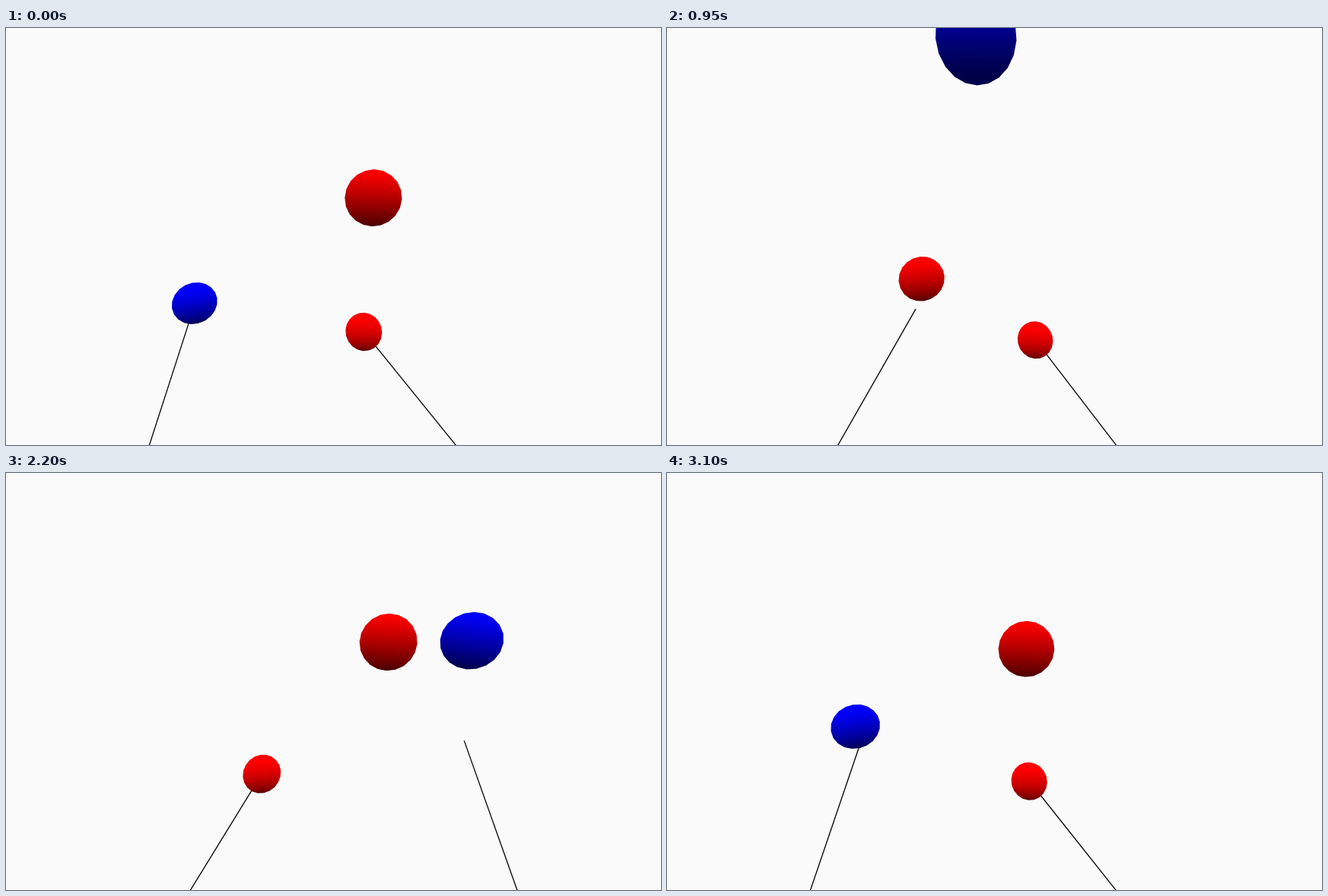
Write an HTML page with a canvas that moves like this. It is 861x549 px and loops after 3.15 s.

```html
<!DOCTYPE html>
<html lang="en">
<head>
<meta charset="utf-8">
<title>Three balls juggled</title>
<style>
  html, body { margin: 0; width: 100%; height: 100%; overflow: hidden; background: #fafafa; }
  canvas { display: block; }
</style>
</head>
<body>
<canvas id="stage" width="861" height="549"></canvas>
<script>
const ctx = document.getElementById('stage').getContext('2d');
const W = 861, H = 549;
const LOOP = 3150, HALF = LOOP / 2, STEP = 50;

// Camera: pitched down, looking at a vertical plane. The unit is one ball radius.
const FOCAL = H / 2 / Math.tan(37.5 * Math.PI / 180);
const COS = 0.777, SIN = 0.629, DIST = 8.45, CENTRE = 0.18;
const AMBIENT = 0.64, LIGHT = [0, 0.35, 0.1];

const mod = (a, n) => ((a % n) + n) % n;
const dot = (a, b) => a[0] * b[0] + a[1] * b[1] + a[2] * b[2];
const scale = (a, k) => a.map(v => v * k);
const add = (...vs) => [0, 1, 2].map(i => vs.reduce((s, v) => s + v[i], 0));
const unit = a => scale(a, 1 / Math.hypot(...a));
const cross = (a, b) => [
  a[1] * b[2] - a[2] * b[1],
  a[2] * b[0] - a[0] * b[2],
  a[0] * b[1] - a[1] * b[0]
];

// World (sideways, height) to camera space; the third axis points at the viewer.
const toCamera = p => [CENTRE + p.u, p.h * COS + DIST * SIN, p.h * SIN - DIST * COS];
const project = c => [W / 2 - FOCAL * c[0] / c[2], H / 2 + FOCAL * c[1] / c[2]];

// Left hand: time, sideways, height. The scoop carries a red ball and happens twice.
const scoop = [
  [1075, -4.18, -12.63], [1130, -4.2, -13.25], [1400, -2.7, -14.59], [1475, -2.16, -14.5],
  [1525, -1.78, -14.1], [1575, -1.5, -13.65], [1645, -1.2, -13.2]
];
const keys = [
  [0, -7.06, -11.1], [200, -7.35, -12.3], [430, -7.1, -11.05], [520, -6.7, -10.4],
  [612, -6.23, -10.5], [950, -4.19, -11.6],
  ...scoop,
  [1880, -2.4, -11.5], [2020, -3.5, -11.9],
  ...scoop.map(([t, u, h]) => [t + 1050, u, h]),
  [2830, -2.5, -11.7], [2975, -4.59, -10.69], [3100, -6.75, -10.75]
];

function keyAt(i) {
  const n = keys.length, k = keys[mod(i, n)];
  return [k[0] + Math.floor(i / n) * LOOP, k[1], k[2]];
}

function leftHand(time) {
  const t = mod(time, LOOP);
  let i = keys.length - 1;
  while (keys[i][0] > t) i--;
  const [a, b, c, d] = [-1, 0, 1, 2].map(j => keyAt(i + j));
  const span = c[0] - b[0], s = (t - b[0]) / span;
  const curve = j => {
    const m0 = (c[j] - a[j]) / (c[0] - a[0]) * span;
    const m1 = (d[j] - b[j]) / (d[0] - b[0]) * span;
    const s2 = s * s, s3 = s2 * s;
    return (2 * s3 - 3 * s2 + 1) * b[j] + (s3 - 2 * s2 + s) * m0
      + (3 * s2 - 2 * s3) * c[j] + (s3 - s2) * m1;
  };
  return { u: curve(1), h: curve(2) };
}

// side: 1 = left, -1 = right
function hand(side, t) {
  const p = leftHand(side > 0 ? t : t + HALF);
  return { u: p.u * side, h: p.h };
}

const high = { from: -95, to: 1050, speed: 0.0125, mid: 476, apex: 474, top: -0.37, fall: 3.3e-5 };
const low = { from: 70, to: 1075, speed: 0.0053, mid: 292, apex: 580, top: -4.98, fall: 3.17e-5 };
const balls = [
  { arc: high, beat: 525, rgb: [0, 0, 255] },
  { arc: low, beat: 1575, rgb: [255, 0, 0] },
  { arc: low, beat: 2625, rgb: [255, 0, 0] }
];

function ballAt({ arc, beat }, t) {
  const since = mod(t - beat - arc.from, LOOP);
  const side = since < HALF ? 1 : -1;
  const p = since % HALF + arc.from;
  if (p >= arc.to) return hand(-side, t);
  return {
    u: side * arc.speed * (p - arc.mid),
    h: arc.top - arc.fall * (p - arc.apex) ** 2
  };
}

function drawArm(side, t) {
  const p = hand(side, t);
  const [x, y] = project(toCamera(p));
  // Where the forearm leaves the stage
  const base = 160.7 - 11 * Math.abs(p.u) - 9.5 * p.h;
  const bx = side > 0 ? base : 865 - base;
  const k = (H + 10 - y) / (H - y);
  ctx.beginPath();
  ctx.moveTo(x, y);
  ctx.lineTo(x + (bx - x) * k, H + 10);
  ctx.stroke();
}

function drawBall(c, rgb) {
  const d = Math.hypot(...c);
  const view = scale(c, -1 / d);
  const facing = dot(LIGHT, view);
  const up = unit(add(LIGHT, scale(view, -facing)));
  const side = cross(up, view);
  const rise = dot(LIGHT, up);

  const dark = project(add(c, scale(up, -1)));
  const lit = project(add(c, up));
  const fill = ctx.createLinearGradient(...dark, ...lit);
  for (let i = 0; i <= 12; i++) {
    const s = i / 6 - 1;
    const level = AMBIENT + s * rise + Math.sqrt(1 - s * s) * facing;
    const k = Math.max(0, Math.min(1, level));
    fill.addColorStop(i / 12, `rgb(${rgb.map(v => Math.round(v * k))})`);
  }

  // Outline seen in perspective, with slightly visible facets
  const rim = 1.01 * Math.sqrt(1 - 1 / (d * d)), sides = 20;
  ctx.beginPath();
  for (let i = 0; i < sides; i++) {
    const a = i / sides * 2 * Math.PI;
    const n = add(scale(view, 1 / d), scale(up, rim * Math.cos(a)), scale(side, rim * Math.sin(a)));
    ctx.lineTo(...project(add(c, n)));
  }
  ctx.closePath();
  ctx.fillStyle = fill;
  ctx.fill();
}

function draw(t) {
  ctx.fillStyle = '#fafafa';
  ctx.fillRect(0, 0, W, H);
  ctx.strokeStyle = '#000';
  ctx.lineWidth = 1.3;
  drawArm(1, t);
  drawArm(-1, t);
  balls
    .map(b => ({ c: toCamera(ballAt(b, t)), rgb: b.rgb }))
    .sort((a, b) => a.c[2] - b.c[2])
    .forEach(b => drawBall(b.c, b.rgb));
}

const start = performance.now();
function tick() {
  const t = Math.max(0, performance.now() - start) % LOOP;
  draw(Math.floor(t / STEP) * STEP);
  requestAnimationFrame(tick);
}
tick();
</script>
</body>
</html>
```
